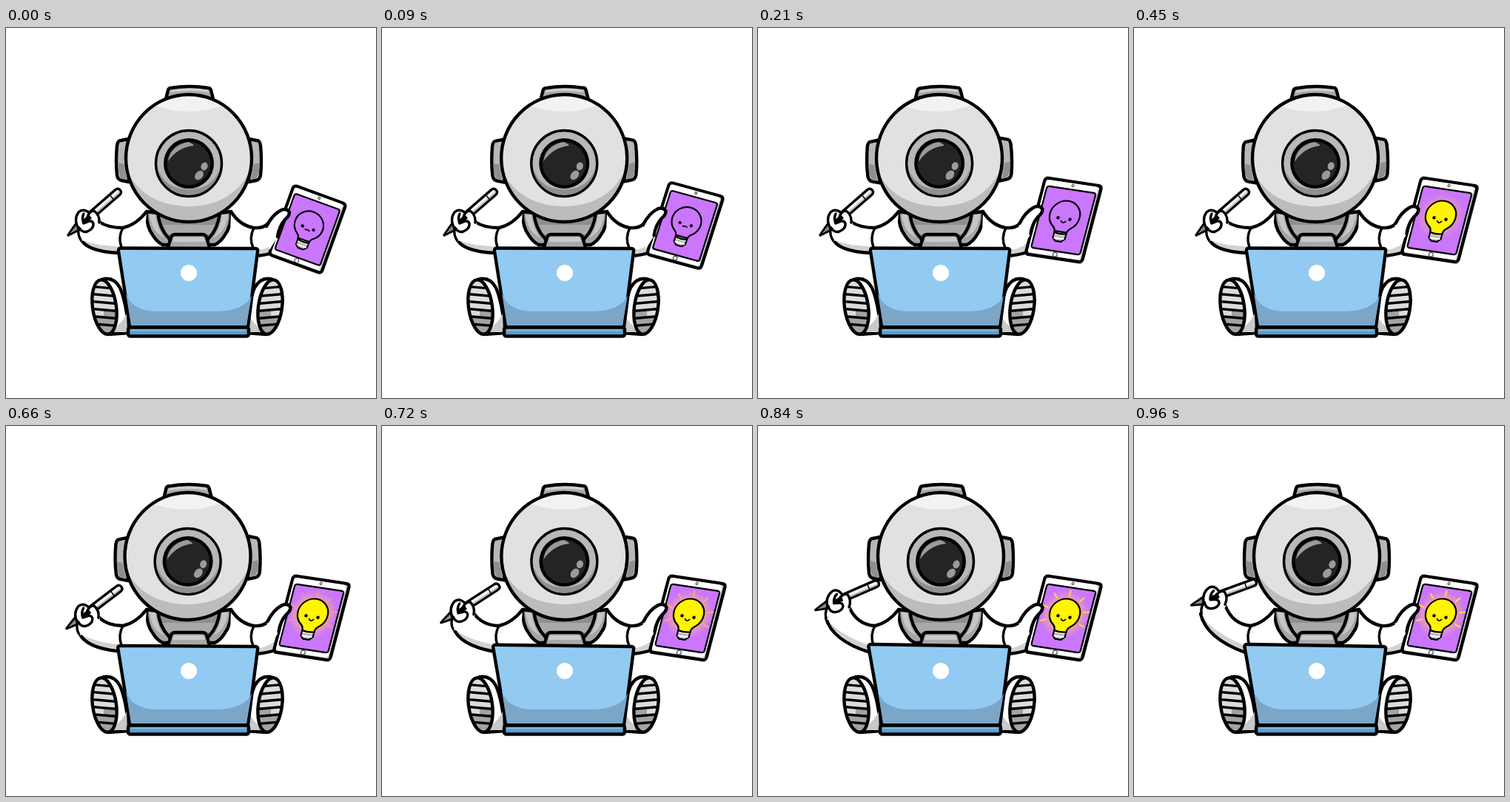
An HTML page that plays this animation: 500x500 px, repeating every 2250 ms.

```html
<!DOCTYPE html>
<html lang="en">
<head>
<meta charset="utf-8">
<title>Astronaut with laptop</title>
<style>
html, body { margin: 0; height: 100%; overflow: hidden; background: #fff; }
svg { display: block; width: 100vw; height: 100vh; }
.ink { stroke: #000; stroke-width: 4.4; stroke-linejoin: round; stroke-linecap: round; }
.mid { stroke-width: 3.4; }
.thin { stroke-width: 2.2; }
.line { fill: none; }
</style>
</head>
<body>
<svg viewBox="0 0 500 500">
  <defs>
    <radialGradient id="glowFill">
      <stop offset=".55" stop-color="#ffb878"/>
      <stop offset="1" stop-color="#ffb878" stop-opacity="0"/>
    </radialGradient>
    <clipPath id="helmet"><ellipse cx="247" cy="176" rx="85" ry="86"/></clipPath>
    <clipPath id="sole"><ellipse cx="133" cy="377" rx="16" ry="37" transform="rotate(-8 133 377)"/></clipPath>
    <g id="strap">
      <path class="ink" fill="#a6a6a6" d="M190 248Q189 268 199 281Q205 290 212 293H222Q224 288 219 283Q208 272 205 250z"/>
      <path fill="#c6c6c6" d="M194 252H202Q204 272 214 283Q197 276 194 252z"/>
    </g>
    <g id="foot">
      <path class="ink" fill="#fff" d="M129 340Q145 335 154 351Q163 372 166 412L138 414z"/>
      <path fill="#c9c9c9" d="M151 402Q158 396 163 386L164 411H146z"/>
      <g clip-path="url(#sole)">
        <path fill="#dcdcdc" d="M110 335h46v84h-46z"/>
        <path fill="#a3a3a3" d="M110 388l22 2v-10h24v40h-46z"/>
        <path class="ink line mid" transform="rotate(5 133 377)" d="M112 351h42M112 361h42M112 371h42M112 381h42M112 391h42M112 401h42"/>
      </g>
      <ellipse class="ink line" cx="133" cy="377" rx="16" ry="37" transform="rotate(-8 133 377)"/>
    </g>
  </defs>

  <path fill="#fff" d="M189 247H305V300H189z"/>
  <path fill="#8f8f8f" d="M205 250H289L274 290H220z"/>
  <path fill="#a9a9a9" d="M212 266H282L276 279H218z"/>
  <use href="#strap"/>
  <use href="#strap" transform="matrix(-1 0 0 1 494 0)"/>
  <path class="ink" fill="#a9a9a9" d="M218 300L223 283Q224 279 229 279H265Q270 279 271 283L276 300z"/>
  <path fill="#c9c9c9" d="M227 283H267L269 289H225z"/>

  <g id="head">
    <path class="ink" fill="#a8a8a8" d="M216 96L219 84Q220 81 223 81Q248 77 273 81Q276 81 277 84L280 96z"/>
    <path fill="#cfcfcf" d="M223 84Q248 79 273 84L274 87Q248 83 222 87z"/>
    <g id="pad">
      <path class="ink" fill="#b7b7b7" d="M165 150L155 152Q151 152 150 159Q148 180 150 199Q151 205 156 206L166 208z"/>
      <path fill="#8f8f8f" d="M151 182L159 184L163 205L156 203Q152 200 151 182z"/>
    </g>
    <use href="#pad" transform="matrix(-1 0 0 1 494 0)"/>
    <ellipse cx="247" cy="176" rx="85" ry="86" fill="#e1e1e1"/>
    <g clip-path="url(#helmet)">
      <path fill="#bcbcbc" d="M160 185Q182 240 248 241Q312 240 334 182V265H160z"/>
      <path fill="#f2f2f2" d="M202 105Q247 75 292 105Q270 113 247 113Q224 113 202 105z"/>
    </g>
    <ellipse class="ink line" cx="247" cy="176" rx="85" ry="86"/>
    <circle class="ink mid" cx="247" cy="183" r="44.5" fill="#b8b8b8"/>
    <path fill="#8f8f8f" d="M204.500 188A42.800 42.800 0 0 0 289.500 188Q280 218 247 218Q214 218 204.500 188z"/>
    <circle cx="247" cy="183" r="34" fill="#000"/>
    <circle cx="247" cy="183" r="29.500" fill="#242424"/>
    <path fill="#9b9b9b" d="M219 180Q222 159 246 154Q252 156 254 159Q232 161 219 180z"/>
    <ellipse cx="268" cy="187" rx="4.500" ry="5.500" fill="#9b9b9b" transform="rotate(20 268 187)"/>
    <ellipse cx="261" cy="199" rx="5" ry="7" fill="#9b9b9b" transform="rotate(40 261 199)"/>
  </g>

  <path id="arm" fill="#fff"/>
  <path id="armShade" fill="#d2d2d2"/>
  <path id="armLine" class="ink line"/>
  <path class="ink line mid" d="M158 270Q151 283 156 296"/>
  <g id="hand">
    <g transform="translate(84 280) rotate(-41)">
      <path class="ink mid" fill="#f4f4f4" d="M0 0L17 -4.500H88Q93 -4.500 93 0Q93 4.500 88 4.500H17z"/>
      <path fill="#b5b5b5" d="M18 1H91L88 3H18z"/>
      <path fill="#8a8a8a" d="M3 0L17 -3V3z"/>
      <path class="ink line" style="stroke-width:1.5" d="M78 -4V4"/>
    </g>
    <path fill="#fff" d="M128 264Q127 253 119 247Q115 247 113 250Q104 244 98 249Q91 259 98 271Q97 282 101 287L122 290z"/>
    <path class="ink line mid" d="M126 263Q127 253 119 247Q115 247 113 250Q104 243 98 249Q91 259 98 271Q97 281 101 286M99 270Q103 277 110 275Q119 271 118 264Q116 259 110 262M105 251Q102 257 105 264L110 262M113 250Q109 254 110 262"/>
    <path d="M103 260L112 252L116 257L108 264z"/>
  </g>

  <path fill="#fff" d="M304 248Q318 268 337 270Q352 270 356 262L376 256V300L358 304L338 308H302z"/>
  <path fill="#d2d2d2" d="M338 300Q352 300 364 290L362 303L338 308z"/>
  <path class="ink line" d="M304 248Q316 267 335 270Q348 271 354 264M336 308Q352 307 364 303"/>
  <path class="ink line mid" d="M335 270Q328 284 334 297"/>

  <g id="tablet">
    <rect class="ink" x="2" y="2" width="76" height="104" rx="4" fill="#cfcfcf"/>
    <rect x="4" y="4" width="70" height="99" rx="3" fill="#fff"/>
    <rect class="ink thin" x="7" y="12.500" width="66" height="84" rx="3" fill="#ca76fd"/>
    <circle cx="40.500" cy="7" r="1.500" fill="#fff" stroke="#333"/>
    <circle cx="40.500" cy="101" r="2.800" fill="#fff" stroke="#333"/>
    <circle id="glow" cx="40" cy="49" r="32" fill="url(#glowFill)"/>
    <g id="rays" stroke-width="2" stroke-linecap="round"></g>
    <path class="ink thin" fill="#bcbcbc" d="M32 70H48V79L44 83H36L32 79z"/>
    <path stroke="#fff" stroke-width="2" d="M33 74H47M33 79H47"/>
    <path id="bulb" class="ink thin" fill="#fff500" d="M32 72Q32 67 28 64A20 20 0 1 1 52 64Q48 67 48 72Q40 74 32 72z"/>
    <circle cx="32" cy="52" r="2.200"/><circle cx="48" cy="52" r="2.200"/>
    <path id="mouth" class="ink line" style="stroke-width:1.7"/>
  </g>
  <g id="grip">
    <path fill="#fff" d="M351 270Q360 252 372 246Q380 243 383 249Q383 254 377 259Q369 268 366 284L356 300z"/>
    <path class="ink line" d="M352 268Q360 252 372 246Q380 243 383 249Q383 254 377 259Q369 268 367 282"/>
  </g>

  <use href="#foot"/>
  <use href="#foot" transform="matrix(-1 0 0 1 490 0)"/>

  <path id="lid" class="ink" fill="#92caf2"/>
  <path fill="#7ba6c8" d="M162 358Q168 380 199 383H287Q324 381 332 361L325 402H169z"/>
  <rect class="ink" x="165" y="404.500" width="163" height="12" rx="3" fill="#5d9ccb"/>
  <path stroke="#7db6df" stroke-width="2.500" d="M169 408.500H324"/>
  <circle cx="247" cy="331" r="11" fill="#fff"/>
</svg>
<script>
const LOOP = 2250;
const $ = id => document.getElementById(id);
const set = (id, name, value) => $(id).setAttribute(name, value);
const mix = (a, b, k) => a.map((v, i) => v + (b[i] - v) * k);
const span = (t, from, to) => Math.min(1, Math.max(0, (t - from) / (to - from)));
const ease = p => p * p * (3 - 2 * p);

$('rays').innerHTML = [-114, -76, -38, 0, 38, 76, 114]
  .map(a => `<path d="M40 24V17" transform="rotate(${a} 40 49)"/>`).join('');

function draw(t) {
  const turn = ease(span(t, 0, 210));      // tablet swings towards the viewer
  const lit = ease(span(t, 260, 420));     // bulb lights up
  const settle = ease(span(t, 590, 800));  // head and lid come back
  const lift = ease(span(t, 560, 940));    // pen hand rises
  const smile = ease(span(t, 60, 240));

  set('head', 'transform', `rotate(${-turn * (1 - settle)} 247 290)`);

  const [x, y, ux, uy, vx, vy] = mix([388, 210, 74, 27, -35, 97], [387, 200, 80, 12, -28, 107], turn);
  set('tablet', 'transform', `matrix(${ux / 80} ${uy / 80} ${vx / 108} ${vy / 108} ${x} ${y})`);
  set('grip', 'transform', `translate(${turn * 1.5} ${-turn * 4})`);
  set('mouth', 'd', `M37 55.5Q40 ${54 + 6 * smile} 43 55.5`);
  set('bulb', 'fill-opacity', lit);
  set('glow', 'opacity', .75 * span(t, 300, 540));
  set('rays', 'opacity', span(t, 550, 760));
  set('rays', 'stroke', `rgb(255 ${160 + 60 * lift} ${110 - 40 * lift})`);

  const [ax, ay, bx, by, cx, cy, dx, dy, ex, ey] = mix(
    [126, 262, 138, 270, 152, 304, 109, 302, 101, 285],
    [123, 242, 133, 268, 150, 306, 98, 287, 90, 254], lift);
  const top = `M${ax} ${ay}Q${bx} ${by} 158 270Q176 266 190 248`;
  const low = `${cx} ${cy}Q${dx} ${dy} ${ex} ${ey}`;
  set('arm', 'd', `${top}L189 262L192 300L${low}z`);
  set('armLine', 'd', `${top}M${low}`);
  set('armShade', 'd', `M${low}Q${dx + 8} ${dy - 8} ${cx + 1} ${cy - 9}z`);
  set('hand', 'transform', `rotate(${21 * lift} 183 244)`);

  const [lx, ly] = mix([152, 297.5], [149.5, 295], settle);
  set('lid', 'd', `M${lx + 3} ${ly}L337 298Q341 298 340 302L327 404H168L${lx} ${ly + 4}Q${lx - .5} ${ly} ${lx + 3} ${ly}z`);
}

const start = performance.now();
function frame() {
  draw((performance.now() - start) % LOOP);
  requestAnimationFrame(frame);
}
frame();
</script>
</body>
</html>
```
